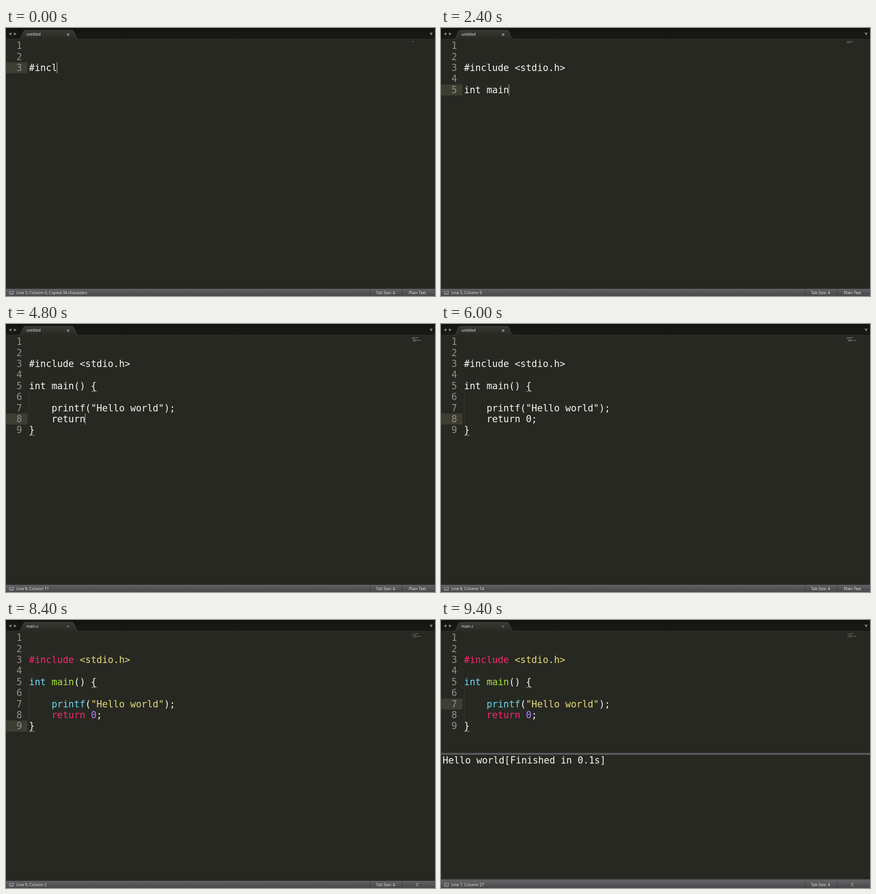
An HTML page that plays this animation: 946 by 592 pixels, repeating every 9.9 s.

```html
<!DOCTYPE html>
<html lang="en">
<head>
<meta charset="utf-8">
<title>Code editor</title>
<style>
html, body { margin: 0; width: 100%; height: 100%; overflow: hidden; background: #272822; }
svg { display: block; width: 946px; height: 592px; }
text { white-space: pre; }
.code { font: 20.6px "DejaVu Sans Mono", monospace; }
.ui { font: 8.63px "Open Sans", sans-serif; fill: #f2f2f0; }
.dialog { font: 9.4px Inter, sans-serif; fill: #222; filter: drop-shadow(0 9px 13px rgba(0, 0, 0, .55)); }
.list { font-size: 8.88px; }
.head { font-size: 8.1px; font-weight: 500; fill: #777; }
.line { fill: none; stroke: #555; stroke-width: 1; }
.btn { fill: #fff; stroke: #c9c9c9; stroke-width: .7; }
</style>
</head>
<body>
<svg viewBox="0 0 946 592">
  <defs>
    <linearGradient id="bar" x2="0" y2="1"><stop stop-color="#12130f"/><stop offset="1" stop-color="#1a1b16"/></linearGradient>
    <linearGradient id="tab" x2="0" y2="1"><stop stop-color="#393a34"/><stop offset="1" stop-color="#272822"/></linearGradient>
    <linearGradient id="foot" x2="0" y2="1"><stop stop-color="#626063"/><stop offset="1" stop-color="#484749"/></linearGradient>
    <linearGradient id="title" x2="0" y2="1"><stop stop-color="#e9e8e9"/><stop offset="1" stop-color="#d2d1d2"/></linearGradient>
    <linearGradient id="blue" x2="0" y2="1"><stop stop-color="#6bb5fb"/><stop offset="1" stop-color="#157bf7"/></linearGradient>
    <clipPath id="frame"><rect x="210" y="40" width="526" height="380" rx="4"/></clipPath>
    <clipPath id="rows"><rect x="325" y="156" width="411" height="233"/></clipPath>
  </defs>
  <rect width="946" height="592" fill="#272822"/>
  <rect width="946" height="25" fill="url(#bar)"/>
  <path d="M0 25H946" stroke="#393a34" stroke-width=".8"/>
  <path d="M28 25.6C36 25 35 5 43 5H145C153 5 152 25 160 25.6Z" fill="url(#tab)"/>
  <path d="M28 25C36 25 35 5 43 5H145C153 5 152 25 160 25" fill="none" stroke="#4b4c46" stroke-width=".9"/>
  <path d="M12 9.8V16.2L6 13ZM17.5 9.8V16.2L23.5 13ZM934 10.5H941L937.5 16.5Z" fill="#85867f"/>
  <g id="scene"></g>
  <rect y="576.5" width="946" height="15.5" fill="url(#foot)"/>
  <path d="M0 576.8H946" stroke="#767477" stroke-width=".7"/>
  <path d="M803.5 577V592M873.5 577V592" stroke="#38373a"/>
  <path d="M7.5 581.5H16.5V588.5H7.5ZM7.5 586H16.5" fill="none" stroke="#b9b8ba" stroke-width=".9"/>
  <text class="ui" x="816" y="587.6">Tab Size: 4</text>
  <text class="ui" id="status" x="23" y="587.6"></text>
  <text class="ui" id="syntax" x="907.5" y="587.6" text-anchor="middle"></text>
</svg>
<script>
const LOOP = 9900, X0 = 50.8, CW = 12.4, TOP = 26.8, ROW = 24.42;
const WHITE = '#f8f8f2', PINK = '#f92672', CYAN = '#66d9ef', GOLD = '#e6db74', LIME = '#a6e22e', VIOLET = '#ae81ff';

const code = {
  3: [['#include', PINK], [' ', WHITE], ['<stdio.h>', GOLD]],
  5: [['int', CYAN, 'italic'], [' ', WHITE], ['main', LIME], ['() {', WHITE]],
  7: [['    ', WHITE], ['printf', CYAN], ['(', WHITE], ['"Hello world"', GOLD], [');', WHITE]],
  8: [['    ', WHITE], ['return', PINK], [' ', WHITE], ['0', VIOLET], [';', WHITE]],
  9: [['}', WHITE]]
};

// chars: how many characters of each row are typed so far
const full = { 3: 99, 5: 99, 7: 99, 8: 99, 9: 99 };
const scenes = [
  { at: 0, rows: 3, line: 3, col: 6, chars: { 3: 5 }, caret: true, note: '; Copied 34 characters' },
  { at: 1200, rows: 5, line: 5, col: 1, chars: { 3: 99 }, caret: true, note: '; Copied 18 characters' },
  { at: 2400, rows: 5, line: 5, col: 9, chars: { 3: 99, 5: 8 }, caret: true },
  { at: 3600, rows: 9, line: 7, col: 1, chars: { 3: 99, 5: 99, 9: 99 } },
  { at: 4800, rows: 9, line: 8, col: 11, chars: { ...full, 8: 10 }, guide: true, caret: true },
  { at: 6000, rows: 9, line: 8, col: 14, chars: full, guide: true },
  { at: 7200, rows: 9, line: 8, col: 14, chars: full, guide: true, dialog: true },
  { at: 8400, rows: 9, line: 9, col: 2, chars: full, guide: true, saved: true },
  { at: 8900, rows: 9, line: 7, col: 27, chars: full, guide: true, saved: true, output: ' ' },
  { at: 9400, rows: 9, line: 7, col: 27, chars: full, guide: true, saved: true, output: 'Hello world[Finished in 0.1s]' }
];

const esc = s => s.replace(/&/g, '&amp;').replace(/</g, '&lt;');
const text = (x, y, s, attrs = '') => `<text x="${x}" y="${y}" ${attrs}>${esc(s)}</text>`;
const rect = (x, y, w, h, fill, attrs = '') => `<rect x="${x}" y="${y}" width="${w}" height="${h}" fill="${fill}" ${attrs}/>`;
const path = (d, attrs = '') => `<path class="line" d="${d}" ${attrs}/>`;
const button = (x, y, w, h) => `<rect class="btn" x="${x}" y="${y}" width="${w}" height="${h}" rx="2.5"/>`;
const dot = (x, y, r, fill) => `<circle cx="${x}" cy="${y}" r="${r}" fill="${fill}"/>`;
const rowTop = n => TOP + (n - 1) * ROW;

function codeRow(n, count, saved) {
  let col = 0, out = '';
  for (const [word, color, style] of code[n]) {
    const part = word.slice(0, Math.max(0, count - col));
    const fill = saved ? color : WHITE;
    const slant = saved && style ? 'font-style="italic"' : '';
    if (part.trim()) out += text(X0 + col * CW, rowTop(n) + 19.3, part, `class="code" fill="${fill}" ${slant}`);
    for (const m of part.matchAll(/\S+/g))
      out += rect(895 + (col + m.index) * .77, 29.6 + (n - 3) * 1.5, m[0].length * .77, 1, fill, 'opacity=".55"');
    col += word.length;
  }
  return out;
}

function editor(s) {
  let out = rect(0, rowTop(s.line), 47.3, ROW, '#3e3d32');
  for (let n = 1; n <= s.rows; n++) {
    out += text(22.9, rowTop(n) + 19.3, String(n), 'class="code" fill="#8f908a"');
    if (s.chars[n]) out += codeRow(n, s.chars[n], s.saved);
  }
  if (s.rows > 5) out += rect(188, 148.2, 12.4, 1, '#a9a9a3') + rect(51, 245.8, 12.4, 1, '#a9a9a3');
  if (s.guide) out += path('M51.5 150V221', 'style="stroke:#46473f" stroke-dasharray="1 1"');
  if (s.caret) out += rect(X0 + (s.col - 1) * CW - .7, rowTop(s.line), 1, ROW, '#c8c8c2');
  out += text(45, 17.2, s.saved ? 'main.c' : 'untitled', 'class="ui"');
  out += s.saved ? path('M134.9 12.3L139.1 16.5M139.1 12.3L134.9 16.5', 'style="stroke:#a0a19b"') : dot(137, 14.5, 2.8, '#80817b');
  if (s.output) {
    out += rect(0, 293.5, 946, 284, '#272822') + rect(0, 293.7, 946, 4, '#5c5b5d') + rect(0, 572.7, 946, 4, '#5c5b5d');
    out += text(3.6, 317, s.output, `class="code" fill="${WHITE}"`);
  }
  return out;
}

const blueFolder = (x, y) => `<path d="M${x} ${y - 4}h4l1 1.2h6v7.3h-11z" fill="#4fb4e8"/>` + rect(x, y - 1.8, 11, 6.3, '#72cbf5', 'rx=".6"');
const grayFolder = y => path(`M223.5 ${y - 4.5}h4.5l1 1.5h7.5v7.5h-13zM223.5 ${y - 1.5}h13`);

function sidebar() {
  const places = ['RolandMerek', 'Tubcrate', 'Applications', 'Desktop', 'Documents', 'Brindovan HD', 'Pux', 'ERN', 'M-Drift'];
  const icons = {
    0: y => path(`M223 ${y}L230 ${y - 6}L237 ${y}M225 ${y - 1}V${y + 5}H235V${y - 1}M228.5 ${y + 5}v-4h3v4`),
    2: y => dot(230, y, 4.8, '#666'),
    3: y => rect(223, y - 5, 14, 10, '#4a4a4a', 'rx="1"') + path(`M225 ${y + 3}h10`, 'stroke-dasharray="1 1" style="stroke:#ddd"'),
    4: y => path(`M224.5 ${y - 5.5}h5l2 2v7h-7zM228.5 ${y - 2.5}h5l2.5 2.5v6h-7.5z`),
    5: y => path(`M225.5 ${y - 6}h9l1.5 8v4h-12v-4zM224 ${y + 2}h12M226 ${y - 3}h8`)
  };
  let out = rect(210, 156, 115, 233, '#d9d7d8') + rect(210, 233, 115, 18, '#a6a4a5');
  out += text(216.5, 170.8, 'Favorites', 'class="head"') + text(216.5, 364.8, 'Tags', 'class="head"');
  places.forEach((name, i) => {
    const y = 184.4 + i * 19.25;
    out += (icons[i] || grayFolder)(y) + text(240.8, y + 3.4, name);
  });
  return out;
}

function fileList() {
  const shots = ['31.22', '31.26', '31.42', '31.47', '33.30', '33.35'];
  const sizes = [11, 12, 12, 13, 14, 15];
  const files = [
    ['Velmora', '19 Jan 2017, 2:38 PM', 'dir'], ['jobs', '9 Dec 2016, 10:49 AM', 'dir'],
    ['M-Drift', '23 Jan 2017, 5:23 PM', 'dir', 'red'], ['Pux', '19 Jan 2017, 2:38 PM', 'dir', 'red'],
    ['ERN', '23 Jan 2017, 12:03 PM', 'dir', 'red'], ['Resource', '11 Jan 2017, 9:42 AM', 'dir'],
    ...shots.map((t, i) => [`Screen Shot 2017-01-27 at 7.${t} PM`, `Today, 7:${t.slice(0, 2)} PM`, 'shot', sizes[i]]),
    ['tarnbox.kelvu.lan.cer', '20 Dec 2016, 9:51 AM', 'doc'],
    ['BriskSchedules.workground', '6 Jan 2017, 6:53 PM', 'play', 3],
    ['To-do-lists', '9 Dec 2016, 10:46 AM', 'dir']
  ];
  let out = rect(325, 156, 411, 233, '#fff') + path('M325 173.5H736M325.2 156V389M560.5 157V173M694.5 157V173', 'style="stroke:#d4d4d4"');
  out += text(330, 168.3, 'Name', 'font-weight="500"') + text(569, 168.3, 'Date Modified');
  out += path('M549 166.5L551.5 164L554 166.5');
  files.forEach(([name, date, kind, extra], i) => {
    const y = 182.6 + i * 14.06, dir = kind === 'dir';
    if (dir) out += `<path d="M332 ${y - 3}V${y + 3}L337 ${y}Z" fill="#777"/>` + blueFolder(345, y);
    else if (kind === 'shot') out += rect(345, y - 3.5, 10.5, 7, '#aaa') + rect(346, y - 2.5, 8.5, 4, '#6d6d6d');
    else out += rect(346.5, y - 5, 8, 10, '#fff', 'stroke="#ddd" stroke-width=".7"') + (kind === 'play' ? rect(349, y, 3.5, 3.5, '#7fb6dc') : '');
    out += text(359, y + 3.2, name, `fill="${dir ? '#1c1c1c' : '#9b9b9b'}"`);
    out += text(569, y + 3.2, date, `fill="${dir ? '#777' : '#9b9b9b'}"`);
    if (extra === 'red') out += dot(546.7, y, 3.8, '#fc5b57');
    else if (extra) out += text(extra > 9 ? 727 : 730.5, y + 3.2, String(extra), 'fill="#9b9b9b"');
  });
  return `<g class="list" clip-path="url(#rows)">${out}</g>`;
}

function toolbar() {
  let out = rect(210, 119, 526, 37, '#f4f3f4') + path('M210 119.3H736M210 156.3H736', 'style="stroke:#d0d0d0"');
  out += button(219, 133, 38.5, 15) + path('M238.3 133V148', 'style="stroke:#d5d5d5"');
  out += path('M229.5 137L226 140.5L229.5 144', 'style="stroke:#333;stroke-width:1.3"');
  out += path('M246.5 137L250 140.5L246.5 144', 'style="stroke:#aaa;stroke-width:1.1"');
  out += button(263, 133, 64.5, 15) + rect(282, 132.8, 23.5, 15.4, '#686768') + button(331, 133, 29.5, 15);
  for (const x of [268.5, 273.5]) for (const y of [137, 141.5]) out += rect(x, y, 3, 3, 'none', 'stroke="#555" stroke-width=".9"');
  out += path('M288 137H299M288 139.4H299M288 141.8H299M288 144.2H299', 'style="stroke:#fff"');
  out += path('M309.5 136.5H320.5V144.5H309.5ZM313.2 136.5V144.5M316.9 136.5V144.5');
  for (const x of [336.5, 340.5, 344.5]) for (const y of [136.5, 141.5]) out += rect(x, y, 2.8, 3.4, '#777');
  out += path('M350.5 139.5L352.8 142L355 139.5');
  out += button(397, 133, 152, 15) + blueFolder(402, 140.5) + text(416.5, 144, 'Desktop');
  out += path('M540.5 138.8L543 136.3L545.5 138.8M540.5 142.3L543 144.8L545.5 142.3');
  out += button(557, 133, 171, 15) + text(626.5, 144, 'Search', 'fill="#8a8a8a"');
  return out + '<circle class="line" cx="617.3" cy="139.8" r="3"/>' + path('M619.5 142L622.3 145');
}

function dialog() {
  let out = rect(210, 40, 526, 380, '#ececec') + rect(210, 40, 526, 16, 'url(#title)') + path('M210 56.2H736', 'style="stroke:#bcbbbc"');
  out += [220.3, 235.2].map(x => `<circle cx="${x}" cy="48" r="4.3" fill="#cfcdce" stroke="#bab8b9" stroke-width=".6"/>`).join('');
  out += dot(250, 48, 4.6, '#28c23a') + text(472.7, 51.4, 'Save', 'text-anchor="middle" fill="#444"');
  out += text(376.5, 85.8, 'Save As:', 'text-anchor="end"') + text(376.5, 107.4, 'Tags:', 'text-anchor="end"');
  out += rect(380.2, 73.2, 185.6, 16.8, '#fff', 'rx="1" stroke="#7fb4ee" stroke-width="2.4"');
  out += text(383.7, 85.8, 'main.c') + rect(412.6, 76, .9, 12, '#111');
  out += rect(381, 96, 184, 15, '#fff', 'stroke="#c2c2c2" stroke-width=".8"');
  out += button(572.3, 74.5, 15, 14.5) + path('M577 83.2L579.8 80.4L582.6 83.2', 'style="stroke:#333;stroke-width:1.2"');
  out += toolbar() + sidebar() + fileList();
  out += path('M210 389.4H736', 'style="stroke:#cfcfcf"');
  out += button(227, 398, 72.5, 14.3) + text(263, 408.6, 'New Folder', 'text-anchor="middle"');
  out += button(621, 398, 51, 14.3) + text(646.5, 408.6, 'Cancel', 'text-anchor="middle"');
  out += rect(677, 397.7, 51.5, 14.8, 'url(#blue)', 'rx="2.5"') + text(702.7, 408.6, 'Save', 'text-anchor="middle" fill="#fff"');
  return `<g class="dialog"><g clip-path="url(#frame)">${out}</g></g>`;
}

const $ = id => document.getElementById(id);
let shown;

function draw() {
  const t = performance.now() % LOOP;
  const s = scenes.findLast(s => s.at <= t);
  if (s !== shown) {
    shown = s;
    $('scene').innerHTML = editor(s) + (s.dialog ? dialog() : '');
    $('status').textContent = `Line ${s.line}, Column ${s.col}${s.note || ''}`;
    $('syntax').textContent = s.saved ? 'C' : 'Plain Text';
  }
  requestAnimationFrame(draw);
}
draw();
</script>
</body>
</html>
```
